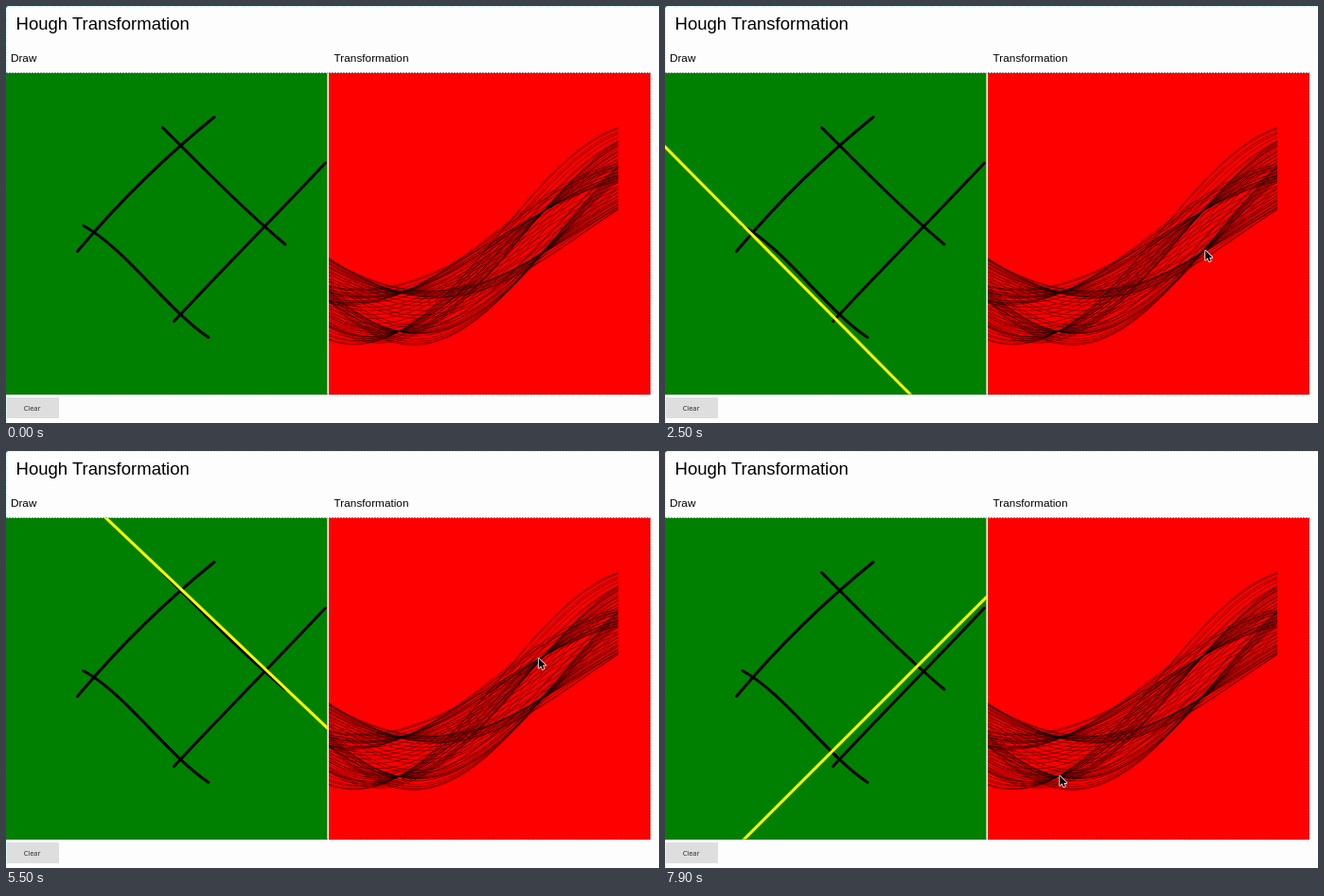
Recreate the animation shown at these times as an HTML page. Size 690x441 px, loop 8 s.

```html
<!DOCTYPE html>
<html lang="en">
<head>
<meta charset="utf-8">
<title>Hough Transformation</title>
<style>
  html, body { margin: 0; width: 100%; height: 100%; overflow: hidden; background: #fdfdfd; }
  svg { display: block; }
  text { font-family: "Liberation Sans", Arial, sans-serif; font-size: 11.8px; fill: #000; }
  .title { font-size: 18.55px; }
  .button { font: 7.4px "Open Sans", "Noto Sans", sans-serif; fill: #222; text-anchor: middle; }
  .edge { fill: none; stroke-width: 1; stroke-dasharray: 2 1; }
  .pen { fill: none; stroke: #000; stroke-width: 3; stroke-linecap: round; }
  .wave { fill: none; stroke: #000; stroke-opacity: .45; stroke-width: 1; }
</style>
</head>
<body>
<svg width="690" height="441" viewBox="0 0 690 441">
  <path class="edge" d="M0 .5H690M.5 0V441" stroke="#c4f8f8"/>
  <path d="M0 0H2L0 2Z" fill="#087878"/>
  <text class="title" x="10.5" y="25">Hough Transformation</text>
  <text x="4.9" y="59">Draw</text>
  <text x="346.6" y="59">Transformation</text>

  <rect y="71" width="339.5" height="340" fill="#008000"/>
  <path class="edge" d="M0 70.5H340M0 410.5H340M.5 71V411" stroke="#2a6a3a" stroke-opacity=".5"/>
  <rect x="341" y="71" width="340" height="340" fill="#f00"/>
  <path class="edge" d="M341 70.5H681M341 410.5H681M680.5 71V411" stroke="#5a1414" stroke-opacity=".5"/>

  <svg y="71" width="339.5" height="339.5" viewBox="0 0 339.5 339.5">
    <g id="strokes"></g>
    <line id="ray" stroke="#ff0" stroke-width="3"/>
  </svg>
  <svg id="space" x="341" y="71" width="340" height="340" viewBox="0 0 340 340"></svg>

  <rect x="1" y="414" width="55" height="22" fill="#dedede"/>
  <text class="button" x="27.6" y="428">Clear</text>
  <path id="cursor" d="M0 0V10.2L2.4 8L4 11.8L5.8 11L4.2 7.4H7.4Z"
        fill="#000" stroke="#fff" stroke-width="1.5" stroke-linejoin="round" paint-order="stroke"/>
</svg>
<script>
const SVG = 'http://www.w3.org/2000/svg';
const $ = id => document.getElementById(id);
const LOOP = 8000, STEP = 100;
const LEFT = 341, TOP = 71;              // corner of the transform panel
const MID = 170, RHO = 3, RANGE = 306;   // its zero line, distance per px, px per half turn
const SAMPLES = 18;

// Pen strokes as cubic curves
const strokes = [
  [[220, 46.5], [172, 85.5], [124, 130.6], [75.5, 188.5]],
  [[165.5, 57.5], [209, 101], [252, 145], [295, 181]],
  [[337.5, 95], [284, 152], [231, 205], [177.5, 262.5]],
  [[82, 161.5], [126, 185.4], [170, 249.8], [214, 279.5]]
];

// Pointer moves: start time, end time, target
const entry = [611, 330];
const moves = [
  [100, 400, 564.6, 274.8],
  [1300, 2200, 571, 260],
  [2200, 2500, 571, 259],
  [2800, 3200, 572, 258],
  [3400, 3900, 569.2, 218.4],
  [4300, 4500, 568, 216.7],
  [5400, 6300, 420, 304.5],
  [6400, 7100, 418, 336],
  [7600, 8000, 417, 345.5]
];

const mix = (a, b, k) => a + (b - a) * k;
const clamp = k => Math.min(1, Math.max(0, k));
const ease = k => k * k * (3 - 2 * k);

let seed = 7;
const random = () => (seed = seed * 16807 % 2147483647) / 2147483647;

function add(parent, cls, d) {
  const path = document.createElementNS(SVG, 'path');
  path.setAttribute('class', cls);
  path.setAttribute('d', d);
  parent.append(path);
}

// Point on a Bezier curve by repeated halving of the control polygon
function along(points, u) {
  if (points.length === 1) return points[0];
  const next = points.slice(1).map((p, i) => p.map((v, c) => mix(points[i][c], v, u)));
  return along(next, u);
}

function wave([x, y]) {
  const points = [];
  for (let px = 0; px <= RANGE; px += 6) {
    const a = px / RANGE * Math.PI;
    points.push(`${px} ${MID + (x * Math.cos(a) + y * Math.sin(a)) / RHO}`);
  }
  add($('space'), 'wave', 'M' + points.join('L'));
}

for (const stroke of strokes) {
  add($('strokes'), 'pen', `M${stroke[0]}C${stroke.slice(1).join(' ')}`);
  for (let i = 0; i < SAMPLES; i++) {
    const u = clamp((i + (random() - .5) * .8) / (SAMPLES - 1));
    wave(along(stroke, mix(u, ease(u), .6)));   // the pen is slower near both ends
  }
}

function pointer(t) {
  if (t < moves[0][0]) return null;
  return moves.reduce((at, [from, to, x, y]) => {
    const k = ease(clamp((t - from) / (to - from)));
    return [mix(at[0], x, k), mix(at[1], y, k)];
  }, entry);
}

function show(el, visible) {
  el.setAttribute('visibility', visible ? 'visible' : 'hidden');
}

function draw(now) {
  const t = Math.floor(now % LOOP / STEP) * STEP;
  const tip = pointer(t), past = pointer(t - STEP);   // the line trails by one step
  show($('cursor'), tip);
  show($('ray'), past);
  if (tip) $('cursor').setAttribute('transform', `translate(${tip[0]} ${tip[1] - .5})`);
  if (past) {
    const a = (past[0] - LEFT) / RANGE * Math.PI;
    const rho = (past[1] - TOP - MID) * RHO;
    const c = Math.cos(a), s = Math.sin(a);
    const ends = { x1: rho * c - 900 * s, y1: rho * s + 900 * c, x2: rho * c + 900 * s, y2: rho * s - 900 * c };
    for (const key in ends) $('ray').setAttribute(key, ends[key]);
  }
}

const start = performance.now();
function tick() {
  draw(performance.now() - start);
  requestAnimationFrame(tick);
}
tick();
</script>
</body>
</html>
```
